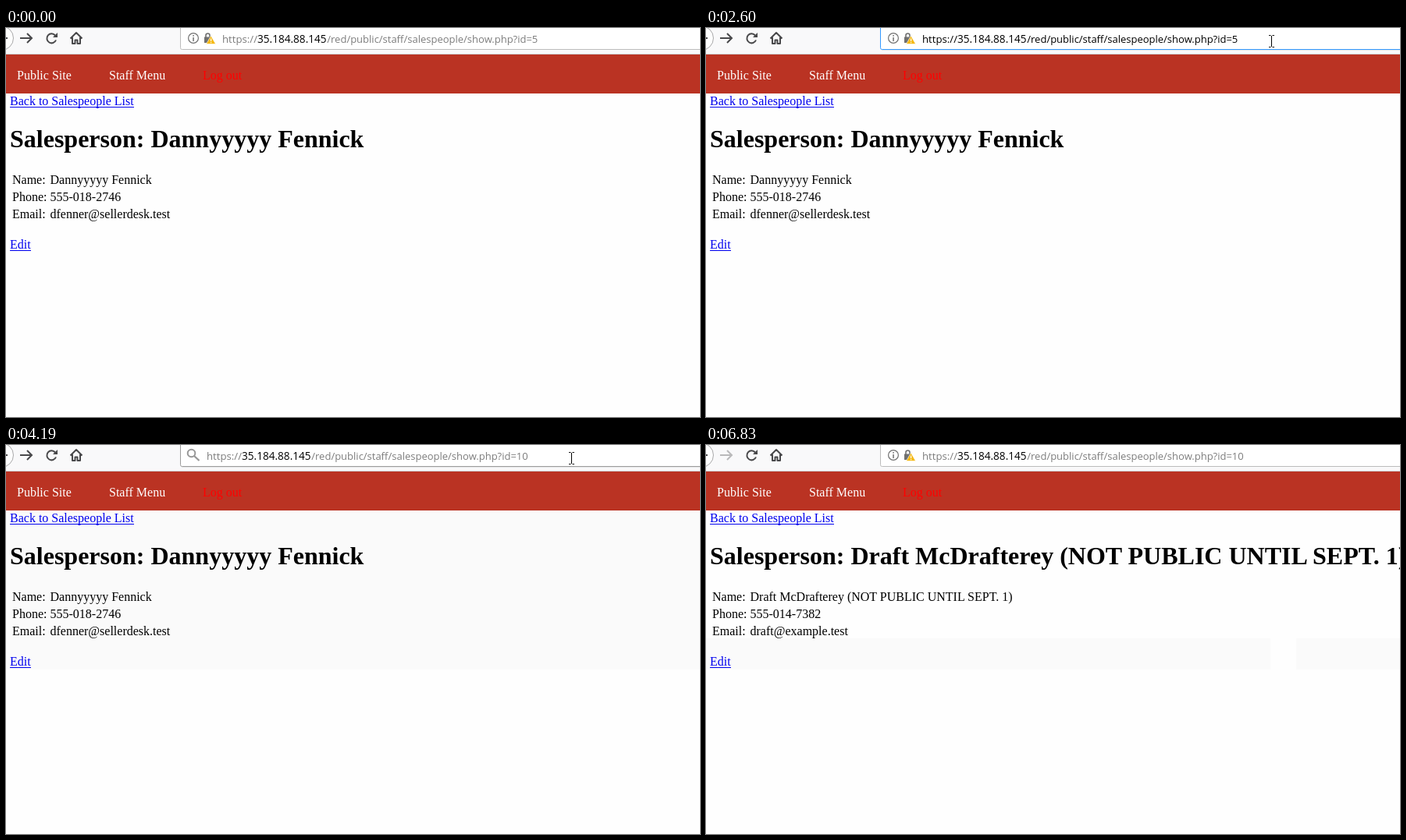
These frames come from a looping animation (889 by 499 pixels, 7740 ms). An HTML page:

```html
<!DOCTYPE html>
<html lang="en">
<head>
<meta charset="utf-8">
<title>Salesperson page</title>
<style>
html, body { margin: 0; width: 100%; height: 100%; overflow: hidden; background: #fefefe; }
svg { display: block; width: 889px; height: 499px; }
text { white-space: pre; }
.ui { font-family: "Open Sans", "Noto Sans", sans-serif; }
.page { font: 16px "Liberation Serif", "Times New Roman", serif; }
.h1 { font-size: 32px; font-weight: bold; }
</style>
</head>
<body>
<svg id="stage" viewBox="0 0 889 499"></svg>
<script>
const LOOP = 7740;
const stage = document.getElementById('stage');
const HOST = 'https://35.184.88.145';
const PATH = '/red/public/staff/salespeople/show.php?id=';

const people = {
  danny: ['Dannyyyyy Fennick', '555-018-2746', 'dfenner@sellerdesk.test'],
  draft: ['Draft McDrafterey (NOT PUBLIC UNTIL SEPT. 1)', '555-014-7382', 'draft@example.test']
};

// Each step lists only what changes at that time.
const steps = [
  [0, { bar: 'idle', url: 'grey', icon: 'site', id: '5', who: 'danny', rows: 0, fade: 1,
        tint: 0, caret: 0, cursor: null, forward: '#48484a', spin: false }],
  [280, { cursor: ['arrow', 819, -3] }],
  [430, { bar: 'hover', cursor: ['beam', 790, 18] }],
  [550, { cursor: ['beam', 757, 18] }],
  [700, { cursor: ['beam', 746, 15] }],
  [820, { cursor: ['beam', 737, 12] }],
  [940, { cursor: ['beam', 730, 14] }],
  [1060, { cursor: ['beam', 726, 16] }],
  [1180, { cursor: ['beam', 724, 17] }],
  [1460, { bar: 'focus' }],
  [1610, { url: 'selected' }],
  [2170, { url: 'black', caret: 682 }],
  [2600, { caret: 0 }],
  [3020, { icon: 'search', id: '', rows: 2, caret: 654 }],
  [3140, { rows: 5 }],
  [3520, { id: '1', caret: 662 }],
  [3670, { id: '10', caret: 670 }],
  [4070, { fade: .5, url: 'grey', caret: 0, bar: 'hover' }],
  [4190, { rows: 0, tint: 84 }],
  [4590, { spin: true }],
  [4710, { tint: 138 }],
  [4860, { icon: 'site', who: 'draft', tint: 248, forward: '#b9b9ba', spin: false }],
  [5560, { cursor: ['beam', 715, 20] }],
  [5850, { cursor: ['beam', 712, 23] }],
  [5980, { bar: 'idle', cursor: ['arrow', 701, 39] }],
  [6140, { cursor: ['arrow', 717, 92] }],
  [6280, { cursor: ['arrow', 723, 169] }],
  [6430, { cursor: ['arrow', 756, 302] }],
  [6560, { cursor: ['arrow', 789, 435] }],
  [6700, { cursor: ['arrow', 791, 474] }],
  [6830, { cursor: null }]
];
let merged = {};
const states = steps.map(([, patch]) => merged = { ...merged, ...patch });

const rect = (x, y, w, h, fill, extra = '') =>
  `<rect x="${x}" y="${y}" width="${w}" height="${h}" fill="${fill}" ${extra}/>`;
const circle = (x, y, r, fill, extra = '') =>
  `<circle cx="${x}" cy="${y}" r="${r}" fill="${fill}" ${extra}/>`;
const line = (d, color, width = 1, extra = '') =>
  `<path d="${d}" fill="none" stroke="${color}" stroke-width="${width}" ${extra}/>`;
const serif = (x, y, s, cls = '', fill = '#000') =>
  `<text class="page ${cls}" x="${x}" y="${y}" fill="${fill}">${s}</text>`;
const link = (x, y, s, width) =>
  serif(x, y, s, '', '#00e') + rect(x, y + 2, width, 1, '#00e');
const ui = (x, y, s, size, fill, extra = '') =>
  `<text class="ui" x="${x}" y="${y}" font-size="${size}" fill="${fill}" ${extra}>${s}</text>`;

function page(s) {
  const [name, phone, mail] = people[s.who];
  let out = '';
  if (s.tint) {
    out += rect(0, s.tint, 889, 288 - s.tint, '#fafafa');
    if (s.who === 'draft') out += rect(723, 248, 33, 40, '#fefefe');
  }
  out += rect(0, 34, 889, 50, '#ba3323');
  out += serif(14, 66, 'Public Site', '', '#fff') + serif(132, 66, 'Staff Menu', '', '#fff')
    + serif(252, 66, 'Log out', '', '#f00');
  out += link(5, 99, 'Back to Salespeople List', 159);
  out += serif(5, 153, 'Salesperson: ' + name, 'h1');
  [['Name:', name], ['Phone:', phone], ['Email:', mail]].forEach(([label, value], i) => {
    out += serif(8, 200 + i * 22, label) + serif(56.5, 200 + i * 22, value);
  });
  return out + link(5, 283, 'Edit', 27);
}

function toolbar(s) {
  const dark = '#48484a';
  const border = { idle: '#bcbcbc', hover: '#9c9c9c', focus: '#3399ff' }[s.bar];
  let out = rect(0, 0, 889, 33, '#f9f9fa') + rect(0, 33, 889, 1, '#cfcfd0');
  out += circle(-6, 13, 15.5, '#fdfdfd', 'stroke="#a9a9aa"') + rect(0, 12, 2, 2, dark);
  out += line('M18 13H33M27 7L33 13L27 19', s.forward, 2);
  out += s.spin
    ? line('M52.5 14A6 6 0 0 1 63 9M64 14A6 6 0 0 1 62 18', dark, 2)
    : line('M63 9.5A6 6 0 1 0 64 15.5', dark, 2);
  out += `<path d="M66 6V12H60Z" fill="${dark}"/>`;
  out += line('M82.5 13.5L90 6L97.5 13.5M85 12V20H88.5V15.5H91.5V20H95V12', dark, 2, 'stroke-linejoin="round"');
  out += rect(223.5, -10, 700, 37.5, '#fff', `rx="2" stroke="${border}"`);
  if (s.bar !== 'idle') out += rect(225, 28, 664, 1, '#000', 'opacity=".08"');
  return out + (s.icon === 'site' ? siteIcon() : searchIcon()) + address(s);
}

function siteIcon() {
  return circle(240, 13, 6.4, 'none', 'stroke="#707070" stroke-width="1.2"')
    + rect(239.3, 12, 1.5, 5, '#707070') + rect(239.3, 9, 1.5, 1.7, '#707070')
    + line('M256 12V9.5A2.5 2.5 0 0 1 261 9.5V12', '#707070', 1.6)
    + rect(254, 11.5, 9, 7.5, '#707070')
    + '<path d="M262.5 10L268.5 20.5H256.5Z" fill="#f5b914" stroke="#fff" stroke-width=".6"/>'
    + rect(262, 13.5, 1.2, 3.5, '#fff') + rect(262, 18, 1.2, 1.2, '#fff');
}

function searchIcon() {
  return circle(237.5, 10.5, 4.8, 'none', 'stroke="#979797" stroke-width="2"')
    + line('M241 14L247.5 20', '#979797', 2.3);
}

function address(s) {
  const x = s.icon === 'site' ? 277 : 257;
  const picked = s.url === 'selected';
  const soft = picked ? '#fff' : s.url === 'grey' ? '#7d7d7d' : '#000';
  let out = picked ? rect(x, 4, 406, 18, '#3399ff') : '';
  out += ui(x, 19, HOST.slice(0, 8), 13.2, soft);
  out += ui(x + 45, 19, HOST.slice(8), 13.6, picked ? '#fff' : '#000');
  out += ui(x + 134.3, 19, PATH + s.id, 13, soft);
  if (s.caret) out += rect(s.caret, 4, 1, 18, '#000');
  return out;
}

function globe(y, color) {
  return `<g transform="translate(241 ${y})" fill="none" stroke="${color}" stroke-width="1.5">
    <circle r="7"/><ellipse rx="3.3" ry="7"/><path d="M-7 -2.5H7M-7 2.5H7"/></g>`;
}

function results(s) {
  const slow = 'Slow Drowser (FIRED FOR STEALING)';
  const first = s.id === '10' ? [slow, 602, '8'] : [people.draft[0], 665, '10', 'wide'];
  const wide = s.id === '' ? 'wide' : '';
  return [
    first,
    ['Clara Felton', 447, '3', wide],
    [people.danny[0], 488, null],
    ['Charlotte Hylen', 468, '6', wide],
    [slow, 602, '10', 'bold']
  ].slice(0, s.rows);
}

function dropdown(s) {
  if (!s.rows) return '';
  const end = 68 + s.rows * 30;
  const full = HOST + PATH + s.id;
  const shift = s.id.length * 7.5;
  let out = rect(0, 34, 889, end + 30, '#fafafa') + rect(0, 33, 889, 1, '#bdbdbd');
  out += rect(0, 38, 889, 30, '#3399ff') + globe(53, '#fff');
  out += ui(258, 59, full, 13.15, '#fff', 'font-weight="600"');
  out += ui(671 + shift, 59, '—', 12, '#fff') + ui(690 + shift, 59, 'Visit', 11.5, '#fff');

  results(s).forEach(([name, dash, id, style], i) => {
    const y = 89 + i * 30;
    out += globe(y - 6, '#6b6b6b') + ui(258, y, 'Staff: Salesperson ' + name, 13, '#000');
    out += ui(dash, y, '—', 12, '#777');
    if (id === null) {
      out += ui(dash + 18, y, 'Switch to Tab', 11.4, '#058b6f');
      out += rect(213.5, y - 11, 12, 8, '#666', 'rx="1"') + rect(211, y - 3, 17, 2, '#666');
    } else {
      const size = style === 'bold' ? 11 : style ? 11.5 : 11.35;
      out += ui(dash + 18, y, HOST + PATH + id, size, '#0066cc', style === 'bold' ? 'font-weight="600"' : '');
    }
  });

  out += rect(0, end + 4, 889, 1, '#cfcfcf');
  out += rect(0, end + 5, 889, 26, s.rows > 2 ? '#f0f0f0' : '#f9f9f9');
  const grey = '#666';
  out += ui(33, end + 23, 'Search for', 11.3, grey, 'text-anchor="end"');
  out += ui(36, end + 23, full, 11.35, '#000');
  out += ui(382 + s.id.length * 6, end + 23, 'with:', 11.3, grey);
  out += rect(0, end + 31, 889, 1, '#cfcfcf');
  return `<g opacity="${s.fade}">${out}${engines(end + 48)}${rect(0, end + 64, 889, 1, '#b4b4b4')}
    ${rect(0, end + 65, 889, 2, '#8a8a8a')}${rect(0, end + 67, 889, 1, '#dadada')}</g>`;
}

function engines(y) {
  let out = circle(-3, y, 8, '#4285f4');
  out += rect(40, y - 8, 16, 16, '#00897b');
  out += circle(97, y, 6, '#222') + circle(146, y, 8, '#de5833') + circle(195, y, 5, '#e53238');
  out += circle(244, y, 7, '#1da1f2') + circle(293, y, 6, '#333');
  for (let x = 22; x < 270; x += 49) out += rect(x, y - 11, 1, 22, '#d2d2d2');
  return out;
}

function pointer(cursor) {
  if (!cursor) return '';
  const [kind, x, y] = cursor;
  const shape = kind === 'beam'
    ? line('M-3 -7.5H-.5M1.5 -7.5H4M.5 -7V7M-3 7.5H-.5M1.5 7.5H4', '#000')
    : '<path d="M.5 .5V16.5L4.3 13L6.7 18.3L9 17.3L6.6 12H11.5Z" fill="#fff" stroke="#000"/>';
  return `<g transform="translate(${x} ${y})">${shape}</g>`;
}

let shown = -1, start = null;
function tick(now) {
  if (start === null) start = now;
  const t = Math.max(0, now - start) % LOOP;
  const i = steps.findLastIndex(([at]) => at <= t);
  if (i !== shown) {
    shown = i;
    const s = states[i];
    stage.innerHTML = rect(0, 0, 889, 499, '#fefefe') + page(s) + toolbar(s) + dropdown(s) + pointer(s.cursor);
  }
  requestAnimationFrame(tick);
}
tick(performance.now());
</script>
</body>
</html>
```
